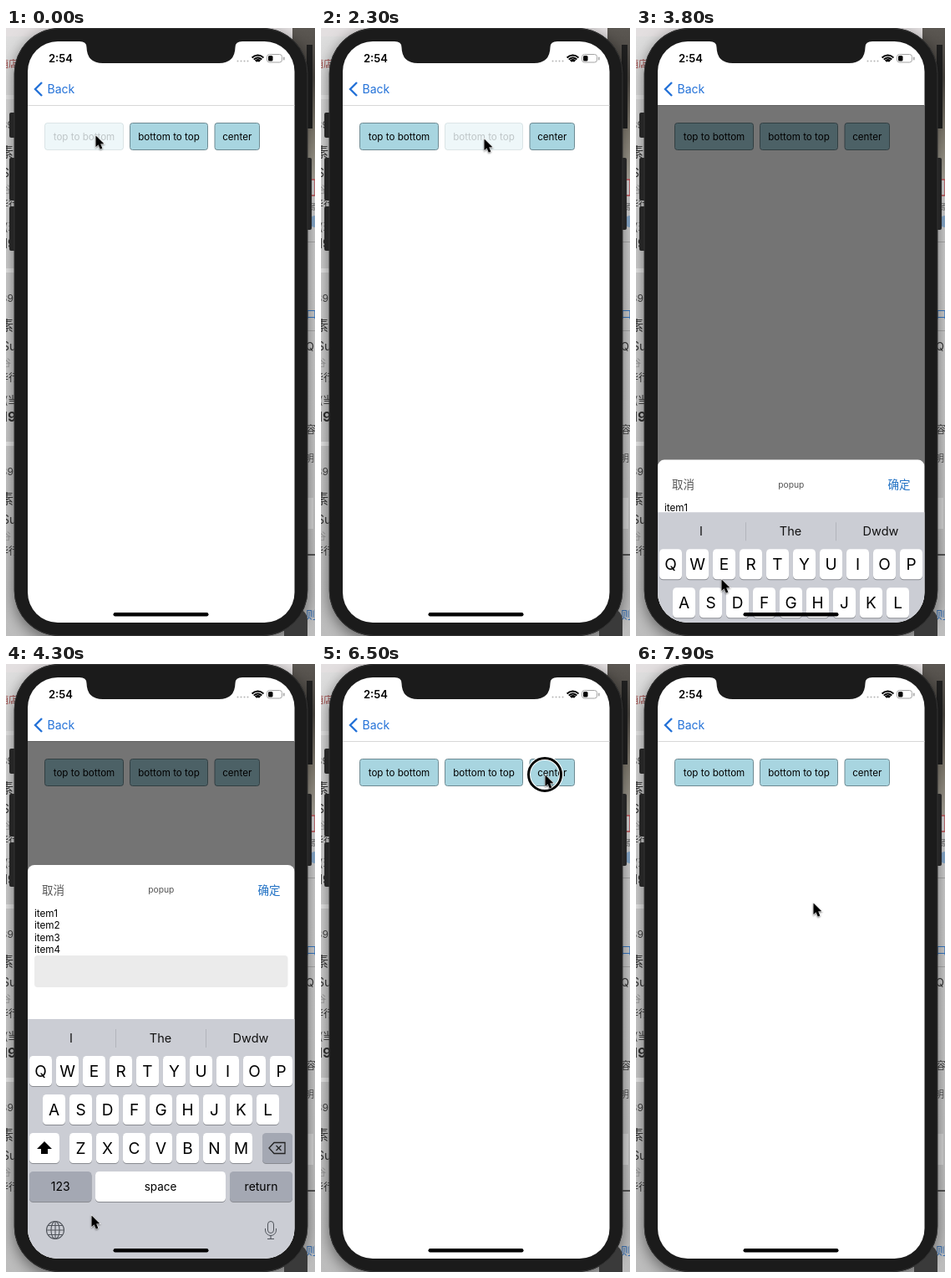
Write an HTML page with a canvas that moves like this. It is 370 by 726 pixels and loops after 8000 ms.

```html
<!DOCTYPE html>
<html lang="en">
<head>
<meta charset="utf-8">
<title>Popup demo</title>
<style>
html, body { margin: 0; width: 370px; height: 726px; overflow: hidden; }
canvas { display: block; }
</style>
</head>
<body>
<canvas id="stage" width="370" height="726"></canvas>
<script>
const ctx = document.getElementById('stage').getContext('2d');
const LOOP = 8000, STEP = 100;
const SANS = 'Inter, sans-serif', CJK = '"Noto Sans CJK SC", "Noto Sans CJK", sans-serif';
const SCREEN = [26, 16, 319.5, 694, 36];
const BLUE = '#2472d8';
const ITEMS = ['item1', 'item2', 'item3', 'item4'];

// time, x, y of the pointer tip
const PATH = [
  [0, 107, 128], [300, 107, 128], [1200, 171, 226], [1600, 171, 226],
  [2000, 195, 132], [2300, 195, 132], [2800, 162, 372], [3400, 101, 656],
  [3800, 102, 658], [4400, 102, 658], [5400, 222, 204], [5800, 222, 204],
  [6300, 262, 152], [6500, 268, 132], [6800, 268, 132], [7300, 212, 285], [8000, 212, 285]
];
const CLICKS = [[1350, 1500], [2050, 2250], [3450, 3650], [5600, 5750], [6450, 6750], [7350, 7500]];

const clamp = v => Math.min(1, Math.max(0, v));
const lerp = (a, b, p) => a + (b - a) * p;
const easeOut = v => 1 - (1 - clamp(v)) ** 3;
const smooth = v => v * v * (3 - 2 * v);
const within = (t, [a, b]) => t >= a && t < b;
const shown = (t, start, end, rise = 400) =>
  easeOut((t - start) / rise) * (1 - easeOut((t - end) / 350));

function rect(x, y, w, h, fill) {
  ctx.fillStyle = fill;
  ctx.fillRect(x, y, w, h);
}

function round(x, y, w, h, r, fill, stroke) {
  ctx.beginPath();
  ctx.roundRect(x, y, w, h, r);
  if (fill) { ctx.fillStyle = fill; ctx.fill(); }
  if (stroke) { ctx.strokeStyle = stroke; ctx.lineWidth = 1; ctx.stroke(); }
}

function text(s, x, y, size, color = '#000', align = 'left', family = SANS, weight = 400) {
  ctx.font = `${weight} ${size}px ${family}`;
  ctx.fillStyle = color;
  ctx.textAlign = align;
  ctx.fillText(s, x, y);
}

function line(points, color, width) {
  ctx.beginPath();
  points.forEach(([x, y]) => ctx.lineTo(x, y));
  ctx.strokeStyle = color;
  ctx.lineWidth = width;
  ctx.stroke();
}

function gradient(y0, y1, ...colors) {
  const g = ctx.createLinearGradient(0, y0, 0, y1);
  colors.forEach((c, i) => g.addColorStop(i / (colors.length - 1), c));
  return g;
}

function desktop() {
  rect(0, 0, 370, 726, gradient(0, 726, '#dedede', '#cfcfcf', '#cbcbcb', '#bdbdbd'));
  rect(0, 0, 343, 10, '#e3dfe0');
  text('酒店', -8, 47, 11, '#a04a48', 'left', CJK);
  for (const y of [115, 322, 529]) {
    rect(0, y - 35, 12, 5, '#e6e6e6');
    text('39', -6, y + 5, 12, '#444');
    text('素', -7, y + 39, 16, '#333', 'left', CJK);
    text('Su', -5, y + 63, 14, '#333');
    text('谷', -5, y + 82, 11, '#999', 'left', CJK);
    text('华行', -9, y + 100, 12, '#333', 'left', CJK);
    if (y < 500) {
      text('(当', -2, y + 127, 12, '#333', 'left', CJK);
      text('19', -5, y + 148, 16, '#333', 'left', SANS, 700);
    }
  }
  rect(343, 0, 27, 180, gradient(0, 180, '#5b5752', '#48443f', '#827c70', '#aaa69b'));
  rect(360, 20, 7, 100, '#202020');
  line([[360, 181], [370, 181], [370, 200], [360, 200]], '#b84a4e', 1.5);
  text('原', 364, 217, 9, '#555', 'left', CJK);
  round(363, 224, 14, 14, 7, '#88aacb');
  rect(361, 255, 9, 1, '#aaa');
  rect(361, 361, 9, 1, '#aaa');
  text('口', 359, 346, 13, '#3477c5', 'left', CJK);
  text('Q', 359, 385, 13, '#333');
  text('容', 359, 484, 12, '#444', 'left', CJK);
  text('明', 358, 518, 11, '#555', 'left', CJK);
  rect(361, 561, 7, 37, '#d9d9d9');
  rect(361, 628, 9, 2, '#555');
  text('则', 359, 705, 13, '#2e69b1', 'left', CJK);
  ctx.save();
  ctx.shadowColor = 'rgba(0,0,0,.5)';
  ctx.shadowBlur = 18;
  ctx.shadowOffsetY = 5;
  round(10, 0, 351, 726, 54, '#1b1b1b');
  ctx.restore();
  round(333, 693, 28, 60, 14, '#3a3a3a');
}

function phone() {
  for (const [y, h] of [[101, 30], [155, 51], [213, 53]]) round(4, y, 8, h, 2, '#252525');
  round(359, 155, 7, 86, 2, '#252525');
  round(10, 0.5, 351, 725, 54, '#1b1b1b', '#343434');
  round(...SCREEN, '#fff');
}

function notch() {
  ctx.beginPath();
  ctx.moveTo(88, 15);
  ctx.lineTo(88, 16);
  ctx.quadraticCurveTo(96.5, 16, 96.5, 23);
  ctx.quadraticCurveTo(97, 42, 116, 42);
  ctx.lineTo(255, 42);
  ctx.quadraticCurveTo(274, 42, 274.5, 23);
  ctx.quadraticCurveTo(274.5, 16, 283, 16);
  ctx.lineTo(283, 15);
  ctx.fillStyle = '#1b1b1b';
  ctx.fill();
}

function statusAndNav() {
  text('2:54', 51, 41, 13, '#000', 'left', SANS, 600);
  for (let i = 0; i < 4; i++) round(276.5 + i * 4, 38.5, 2, 2, 1, '#b5b5b5');
  for (const r of [3.5, 6.5, 9.5]) {
    ctx.beginPath();
    ctx.arc(301.5, 42, r, -Math.PI * 0.76, -Math.PI * 0.24);
    ctx.strokeStyle = '#000';
    ctx.lineWidth = r < 4 ? 3 : 1.9;
    ctx.stroke();
  }
  round(312.5, 31.5, 18, 9.5, 3, null, '#a3a3a3');
  round(314, 33, 5.5, 6.5, 1.5, '#000');
  round(332, 34.5, 1.5, 4, 1, '#a3a3a3');
  line([[43, 65], [35, 73], [43, 81]], BLUE, 2.4);
  text('Back', 49.5, 78, 14, BLUE);
}

function button(label, x, w, pressed) {
  ctx.globalAlpha = pressed ? 0.2 : 1;
  round(x + 0.5, 113.5, w, 32, 3, '#a8d5e0', '#6e8a92');
  text(label, x + 0.5 + w / 2, 133.5, 11.6, '#000', 'center');
  ctx.globalAlpha = 1;
}

function items(x, y) {
  ITEMS.forEach((s, i) => text(s, x, y + i * 14.6, 11.7));
}

function popupContent(x, y, w) {
  text('取消', x + 17, y + 34.5, 13.5, '#555', 'left', CJK);
  text('popup', x + w / 2, y + 33, 10.3, '#555', 'center');
  text('确定', x + w - 17, y + 34.5, 13.5, '#1f70c4', 'right', CJK);
  items(x + 8, y + 61.5);
  round(x + 8, y + 108, w - 16, 38, 4, '#ebebeb');
}

function overlay(p) {
  rect(26, 92, 320, 620, `rgba(0,0,0,${0.545 * p})`);
}

function key(label, x, y, w, dark, size) {
  round(x, y + 1, w, 36, 4.5, '#898b91');
  round(x, y, w, 36, 4.5, dark ? '#a4a8b3' : '#fff');
  text(label, x + w / 2, y + 18 + size * 0.36, size, '#000', 'center');
}

function keyRow(letters, x, y) {
  [...letters].forEach((c, i) => key(c, x + i * 32, y, 27, false, 19));
}

function polygon(points, fill, stroke) {
  ctx.beginPath();
  points.forEach(([x, y]) => ctx.lineTo(x, y));
  ctx.closePath();
  if (stroke) { ctx.strokeStyle = stroke; ctx.lineWidth = 1.3; ctx.stroke(); }
  if (fill) { ctx.fillStyle = fill; ctx.fill(); }
}

function globe() {
  ctx.strokeStyle = '#50545b';
  ctx.lineWidth = 1.1;
  for (const rx of [10.5, 5]) {
    ctx.beginPath();
    ctx.ellipse(0, 0, rx, 10.5, 0, 0, 7);
    ctx.stroke();
  }
  line([[0, -10.5], [0, 10.5]], '#50545b', 1.1);
  for (const [y, w] of [[-5.5, 9], [0, 10.5], [5.5, 9]]) line([[-w, y], [w, y]], '#50545b', 1.1);
}

function microphone() {
  round(-3.5, -10.5, 7, 14, 3.5, null, '#50545b');
  ctx.beginPath();
  ctx.moveTo(-6.5, -2);
  ctx.lineTo(-6.5, 0);
  ctx.arc(0, 0, 6.5, Math.PI, 0, true);
  ctx.lineTo(6.5, -2);
  ctx.stroke();
  line([[0, 6.5], [0, 10.5]], '#50545b', 1.1);
  line([[-4, 10.5], [4, 10.5]], '#50545b', 1.1);
}

function at(x, y, draw) {
  ctx.save();
  ctx.translate(x, y);
  draw();
  ctx.restore();
}

// Drawn with its top edge at 0
function keyboard() {
  rect(26, 0, 320, 290, '#cbcdd4');
  for (const x of [131, 239]) rect(x, 12, 1, 22, '#b3b5bc');
  text('I', 78, 27.5, 14.5, '#111', 'center');
  text('The', 185, 27.5, 14.5, '#111', 'center');
  text('Dwdw', 293, 27.5, 14.5, '#111', 'center');
  keyRow('QWERTYUIOP', 28, 44);
  keyRow('ASDFGHJKL', 44, 90);
  keyRow('ZXCVBNM', 76, 136);
  key('', 28, 136, 36, false, 14);
  key('', 307, 136, 36, true, 14);
  key('123', 28, 182, 74.5, true, 14);
  key('space', 107, 182, 156, false, 13.5);
  key('return', 268, 182, 75, true, 14);
  at(46, 154, () => polygon([[0, -8], [9, 1], [4, 1], [4, 7], [-4, 7], [-4, 1], [-9, 1]], '#000'));
  at(325, 154, () => {
    polygon([[-10, 0], [-4, -6.5], [9, -6.5], [9, 6.5], [-4, 6.5]], null, '#222');
    line([[-1.5, -3], [4.5, 3]], '#222', 1.3);
    line([[-1.5, 3], [4.5, -3]], '#222', 1.3);
  });
  at(59, 252, globe);
  at(317, 252, microphone);
}

function topPopup(p) {
  if (p <= 0) return;
  overlay(p);
  ctx.save();
  ctx.beginPath();
  ctx.rect(26, 92, 320, 620);
  ctx.clip();
  const y = lerp(18, 92, p);
  round(26, y, 319.5, 74.5, [0, 0, 8, 8], '#fff');
  items(34, y + 19.5);
  ctx.restore();
  rect(26, 92, 320, 1, '#d8d8d8');
}

function bottomPopup(p, lift, keys) {
  if (p <= 0) return;
  overlay(p);
  const y = lerp(711, 543, p) - 303 * lift;
  round(26, y, 319.5, 760, 8, '#fff');
  popupContent(26, y, 319.5);
  if (keys > 0) at(0, lerp(710, 424, keys), keyboard);
}

function centerPopup(p) {
  if (p <= 0) return;
  overlay(p);
  ctx.save();
  ctx.globalAlpha = p;
  ctx.translate(185, 401.5);
  ctx.scale(p, p);
  round(-139, -77, 278, 154, 8, '#fff');
  popupContent(-139, -77, 278);
  ctx.restore();
}

function pointer(t) {
  const i = PATH.findIndex(k => k[0] > t);
  const [a, b] = [PATH[i - 1], PATH[i]];
  const p = smooth((t - a[0]) / (b[0] - a[0]));
  at(lerp(a[1], b[1], p), lerp(a[2], b[2], p), () => {
    if (CLICKS.some(c => within(t, c))) {
      for (const [width, color] of [[5, '#fff'], [3, '#000']]) {
        ctx.beginPath();
        ctx.arc(0, 0, 19.5, 0, 7);
        ctx.strokeStyle = color;
        ctx.lineWidth = width;
        ctx.stroke();
      }
    }
    ctx.shadowColor = 'rgba(0,0,0,.35)';
    ctx.shadowBlur = 2;
    ctx.shadowOffsetY = 1;
    polygon([[0.5, 0.5], [0.5, 14], [3.6, 11.2], [5.8, 16.5], [8.3, 15.4], [6.1, 10.3], [10.3, 10.3]], '#000', '#fff');
  });
}

function draw(t) {
  desktop();
  phone();
  ctx.save();
  ctx.beginPath();
  ctx.roundRect(...SCREEN);
  ctx.clip();
  rect(26, 92, 320, 1, '#d8d8d8');
  button('top to bottom', 46, 94, within(t, [0, 200]));
  button('bottom to top', 148, 93, within(t, [2200, 2400]));
  button('center', 249.5, 53.5, within(t, [6700, 6900]));
  topPopup(shown(t, 100, 1500));
  bottomPopup(shown(t, 2300, 5800), shown(t, 3786, 5800, 450), shown(t, 3707, 5800, 500));
  centerPopup(shown(t, 6800, 7500, 300));
  statusAndNav();
  round(128.5, 698, 114, 4.5, 2.2, '#000');
  ctx.restore();
  notch();
  pointer(t);
}

const start = performance.now();
function frame() {
  const t = (performance.now() - start) % LOOP;
  draw(Math.floor(t / STEP) * STEP);
  requestAnimationFrame(frame);
}
frame();
</script>
</body>
</html>
```
